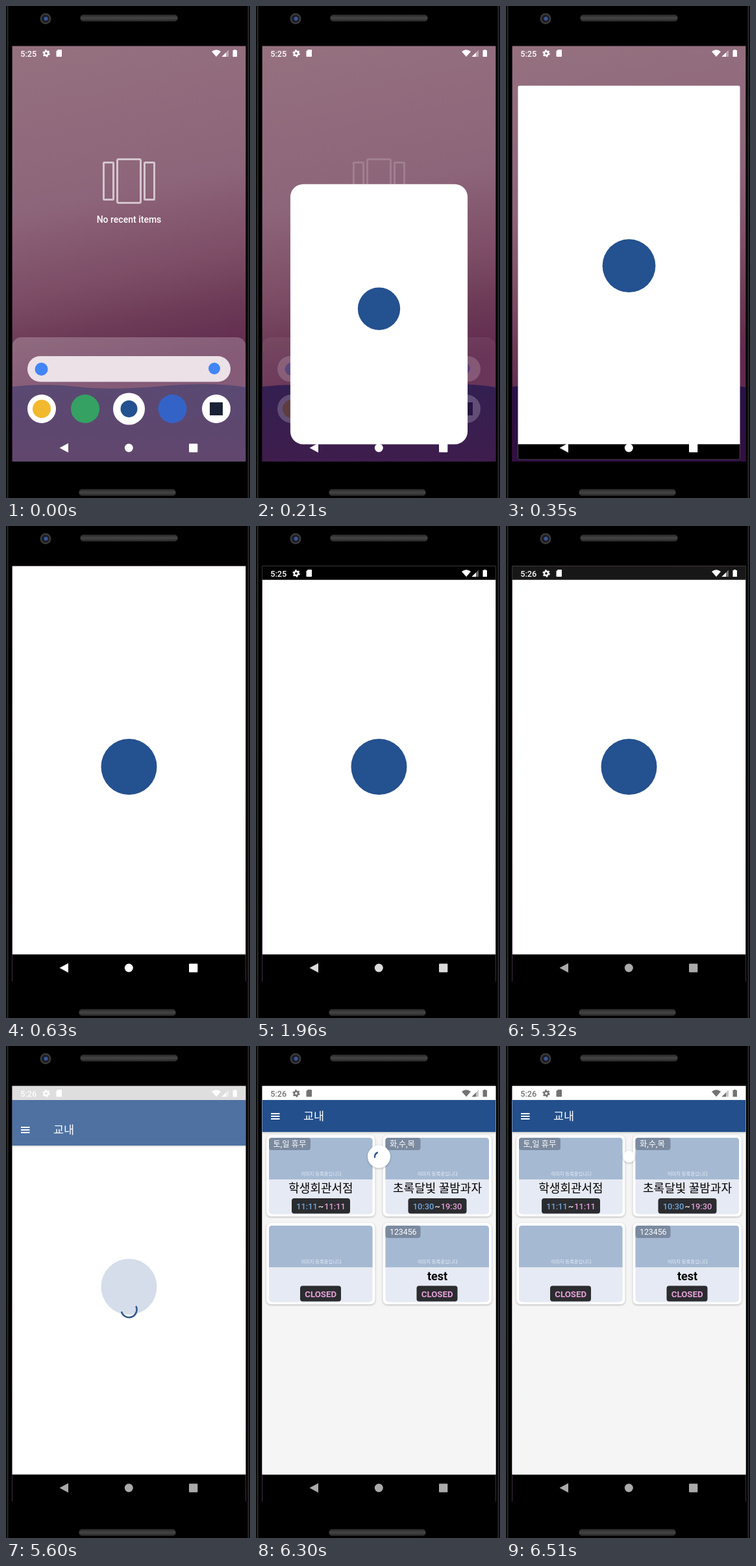
Write an HTML page that moves like this. It is 376 px wide and 756 px high and loops after 6.58 s.

```html
<!DOCTYPE html>
<html lang="ko">
<head>
<meta charset="utf-8">
<title>App launch</title>
<style>
  html, body { margin: 0; width: 100%; height: 100%; overflow: hidden; background: #000; }
  svg { display: block; width: 100%; height: 100%; }
  text { font-family: Roboto, "Noto Sans CJK KR", "Noto Sans CJK", sans-serif; font-weight: 500; }
  .mid { text-anchor: middle; }
  .lift { filter: drop-shadow(0 1px 1.5px #0004); }
</style>
</head>
<body>
<svg viewBox="0 0 376 756">
  <defs>
    <linearGradient id="sky" x1="0" y1="0" x2=".12" y2="1">
      <stop offset="0" stop-color="#95717f"/>
      <stop offset=".4" stop-color="#8d657a"/>
      <stop offset=".6" stop-color="#7d4d66"/>
      <stop offset=".72" stop-color="#6c3a56"/>
      <stop offset=".85" stop-color="#60294f"/>
    </linearGradient>
    <linearGradient id="hill" x1="0" y1="0" x2="0" y2="1">
      <stop offset="0" stop-color="#271248"/>
      <stop offset="1" stop-color="#320f41"/>
    </linearGradient>
    <linearGradient id="grille" x1="0" y1="0" x2="0" y2="1">
      <stop offset="0" stop-color="#2a2a2a"/>
      <stop offset=".5" stop-color="#444"/>
      <stop offset="1" stop-color="#2a2a2a"/>
    </linearGradient>
    <clipPath id="screen"><rect x="9.600" y="61.600" width="359.800" height="638.400"/></clipPath>
    <clipPath id="crop"><rect id="cropBox" x="9.600" width="359.800"/></clipPath>
  </defs>

  <!-- phone body -->
  <rect width="376" height="756"/>
  <rect x="2.500" y="-20" width="371" height="800" rx="20" fill="none" stroke="#2c2c2c" stroke-width="2"/>
  <g fill="url(#grille)" stroke="#1d1d1d">
    <rect x="114.500" y="13.500" width="150" height="10" rx="4.500"/>
    <rect x="112.500" y="742.500" width="149" height="10" rx="4.500"/>
  </g>
  <circle cx="61" cy="19.500" r="8.500" fill="#3a3a3a"/>
  <circle cx="61" cy="19.500" r="6" fill="#1c1c26"/>
  <circle cx="61.500" cy="19.500" r="3" fill="#3a5694"/>

  <g clip-path="url(#screen)">
    <rect x="9" y="61" width="361" height="639" fill="url(#sky)"/>
    <path d="M9 585Q60 579 110 585T240 584T370 586V700H9Z" fill="url(#hill)"/>

    <g id="home">
      <g fill="none" stroke="#fff" stroke-opacity=".62" stroke-width="3">
        <rect x="171.500" y="235.500" width="36" height="67" rx="2"/>
        <rect x="150.500" y="240.500" width="15" height="57" rx="1"/>
        <rect x="213.500" y="240.500" width="15" height="57" rx="1"/>
      </g>
      <text class="mid" x="189.500" y="333" font-size="14" fill="#fff">No recent items</text>
      <rect x="9.600" y="509" width="359.800" height="210" rx="14" fill="#fff" fill-opacity=".23"/>
      <rect x="33" y="538" width="313" height="39.500" rx="19.700" fill="#ebe1e7"/>
      <circle cx="54.500" cy="558" r="10" fill="#4285f4"/>
      <circle cx="321" cy="557" r="9" fill="#4285f4"/>
      <g fill="#fff">
        <circle cx="55" cy="619" r="22"/>
        <circle cx="189.500" cy="619" r="24.500"/>
        <circle cx="324" cy="619" r="22"/>
      </g>
      <circle cx="55" cy="619" r="14" fill="#f2b92e"/>
      <circle cx="122" cy="619" r="22" fill="#35a163"/>
      <circle cx="189.500" cy="619" r="13" fill="#24518f"/>
      <circle cx="256.500" cy="619" r="22" fill="#3463c8"/>
      <rect x="314" y="609" width="20" height="20" fill="#1c2236"/>
    </g>

    <g id="win"><g clip-path="url(#crop)">
      <rect x="9" y="61" width="361" height="639" fill="#fff"/>
      <rect x="9" y="658.300" width="361" height="42"/>
      <circle cx="189.500" cy="370" r="43" fill="#24518f"/>
    </g></g>

    <g id="app">
      <rect x="9" y="61" width="361" height="597.300" fill="#fff"/>
      <g id="list">
        <rect x="9" y="83" width="361" height="575.300" fill="#f5f5f5"/>
        <g id="cards"></g>
      </g>
      <rect id="bar" class="lift" x="9" y="83" width="361" fill="#234f8c"/>
      <g id="heading" fill="#fff">
        <path d="M23 104H36.500M23 108H36.500M23 112H36.500" stroke="#fff" stroke-width="2"/>
        <text x="73" y="113.500" font-size="17.500">교내</text>
      </g>
    </g>
    <circle id="disk" class="lift" cx="189.500" cy="170" fill="#fff"/>
    <path id="arc" fill="none" stroke="#33598b" stroke-width="2.600"/>

    <rect id="shade" x="9" y="61" width="361" height="21.700"/>
    <g id="status" fill="currentColor">
      <text id="clock" x="22.300" y="77.500" font-size="12.700"></text>
      <circle cx="62" cy="72.800" r="3.100" fill="none" stroke="currentColor" stroke-width="2.500"/>
      <circle cx="62" cy="72.800" r="4.900" fill="none" stroke="currentColor" stroke-width="1.700" stroke-dasharray="2.600 2.531"/>
      <path d="M80 67H85Q86 67 86 68V77Q86 78 85 78H78.500Q77.500 78 77.500 77V69.500Z"/>
      <path d="M317 70Q324 64.500 331 70L324 78Z"/>
      <path d="M343 67.500V78H332.500Z" opacity=".4"/>
      <path d="M339 71.500V78H332.500Z"/>
      <path d="M351 67H354V68H356V78H349.500V68H351Z"/>
    </g>
    <g id="nav">
      <path d="M82.500 679L96 671.700V686.300Z"/>
      <circle cx="189.300" cy="679" r="6.500"/>
      <rect x="282" y="672.500" width="13.300" height="13.300" rx="1"/>
    </g>
  </g>
</svg>
<script>
const LOOP = 6580;
const $ = id => document.getElementById(id);
const set = (id, attrs) => {
  for (const k in attrs) $(id).setAttribute(k, attrs[k]);
};
const show = (id, on) => set(id, { visibility: on ? "visible" : "hidden" });
const ramp = (t, from, to) => Math.min(1, Math.max(0, (t - from) / (to - from)));
const mix = (a, b, p) => a + (b - a) * p;

function card(col, row, title, badge, badgeWidth, hours) {
  const label = badge && `
    <rect x="20" y="141" width="${badgeWidth}" height="19" rx="4" fill="#7b8a9f"/>
    <text x="26.500" y="155" font-size="12.300" fill="#fff" style="font-weight:400">${badge}</text>`;
  const times = hours ? `
    <rect x="55" y="234" width="90" height="23.500" rx="4" fill="#2b2c2f"/>
    <g font-size="12.800">
      <text x="94.700" y="250.500" text-anchor="end" fill="#72a7dc">${hours[0]}</text>
      <text class="mid" x="100" y="250.500" fill="#fff">~</text>
      <text x="105.300" y="250.500" fill="#e59fd8">${hours[1]}</text>
    </g>` : `
    <rect x="68" y="233.500" width="63" height="24" rx="4" fill="#2b2c2f"/>
    <text class="mid" x="99.700" y="250.500" font-size="13.300" fill="#e59fd8" style="font-weight:700">CLOSED</text>`;
  return `<g transform="translate(${col * 179.5} ${row * 135})">
    <rect class="lift" x="16" y="137" width="167.500" height="125" rx="7" fill="#fff"/>
    <rect x="20" y="141" width="159.500" height="117.500" rx="5" fill="#e6eaf4"/>
    <path d="M20 205V146Q20 141 25 141H174.500Q179.500 141 179.500 146V205Z" fill="#a5b9d3"/>
    <text class="mid" x="100.500" y="199" font-size="7.300" fill="#fff" fill-opacity=".75" style="font-weight:400">이미지 등록중입니다</text>
    ${label}
    <text class="mid" x="100" y="224.500" font-size="18">${title}</text>
    ${times}</g>`;
}

$("cards").innerHTML =
  card(0, 0, "학생회관서점", "토,일 휴무", 64, ["11:11", "11:11"]) +
  card(1, 0, "초록달빛 꿀밤과자", "화,수,목", 54, ["10:30", "19:30"]) +
  card(0, 1, "", "", 0) +
  card(1, 1, '<tspan font-weight="700">test</tspan>', "123456", 54);

function arcPath(cx, cy, r, start, sweep) {
  const point = deg => {
    const a = deg * Math.PI / 180;
    return `${cx + r * Math.cos(a)} ${cy + r * Math.sin(a)}`;
  };
  return `M${point(start)}A${r} ${r} 0 ${sweep > 180 ? 1 : 0} 1 ${point(start + sweep)}`;
}

function openWindow(t) {
  const left = 1 - ramp(t, 50, 638);
  const grow = 1 - left ** 4, move = 1 - left ** 2.95;
  const scale = mix(.135, 1, grow), height = mix(350, 638.8, move);
  set("home", { opacity: 1 - ramp(t, 70, 260) });
  set("win", {
    opacity: ramp(t, 70, 130),
    transform: `translate(189.5 ${mix(619, 381, move)}) scale(${scale}) translate(-189.5 -381)`
  });
  set("cropBox", { y: 381 - height / 2, height, rx: 180 * left ** 6 });
}

function spinner(t, settled, listed) {
  const start = -26 + .27 * (t - 5600);
  const sweep = 150 + 120 * Math.sin((t - 5600) / 1333 * 2 * Math.PI + .34);
  const shrink = 1 - ramp(t, 6440, 6590);
  const cy = listed ? 170 : settled ? 395 : 405;
  show("arc", t >= 5460);
  set("arc", {
    d: arcPath(189.5, cy, listed ? 6.6 * shrink : 12, start, sweep),
    opacity: listed && shrink < 1 ? Math.max(0, shrink * 2.5 - 1.5) : ramp(t, 5460, 5560)
  });
  show("disk", listed);
  set("disk", { r: 17.5 * shrink });
}

function draw(now) {
  const t = now % LOOP;
  const settled = t >= 5950, listed = t >= 6090;
  openWindow(t);

  set("app", { opacity: ramp(t, 5330, 5667) });
  set("bar", { height: settled ? 49 : 70 });
  set("heading", { transform: `translate(0 ${settled ? 0 : 21})` });
  show("list", listed);
  show("cards", t >= 6300);
  spinner(t, settled, listed);

  set("shade", { opacity: ramp(t, 1210, 1400) - ramp(t, 5289, 5648) });
  set("status", { color: settled ? "#737373" : "#fff" });
  $("clock").textContent = t < 3010 ? "5:25" : "5:26";
  const grey = Math.round(mix(255, 170, ramp(t, 1610, 2450)));
  set("nav", { fill: `rgb(${grey},${grey},${grey})` });
  requestAnimationFrame(draw);
}
requestAnimationFrame(draw);
</script>
</body>
</html>
```
